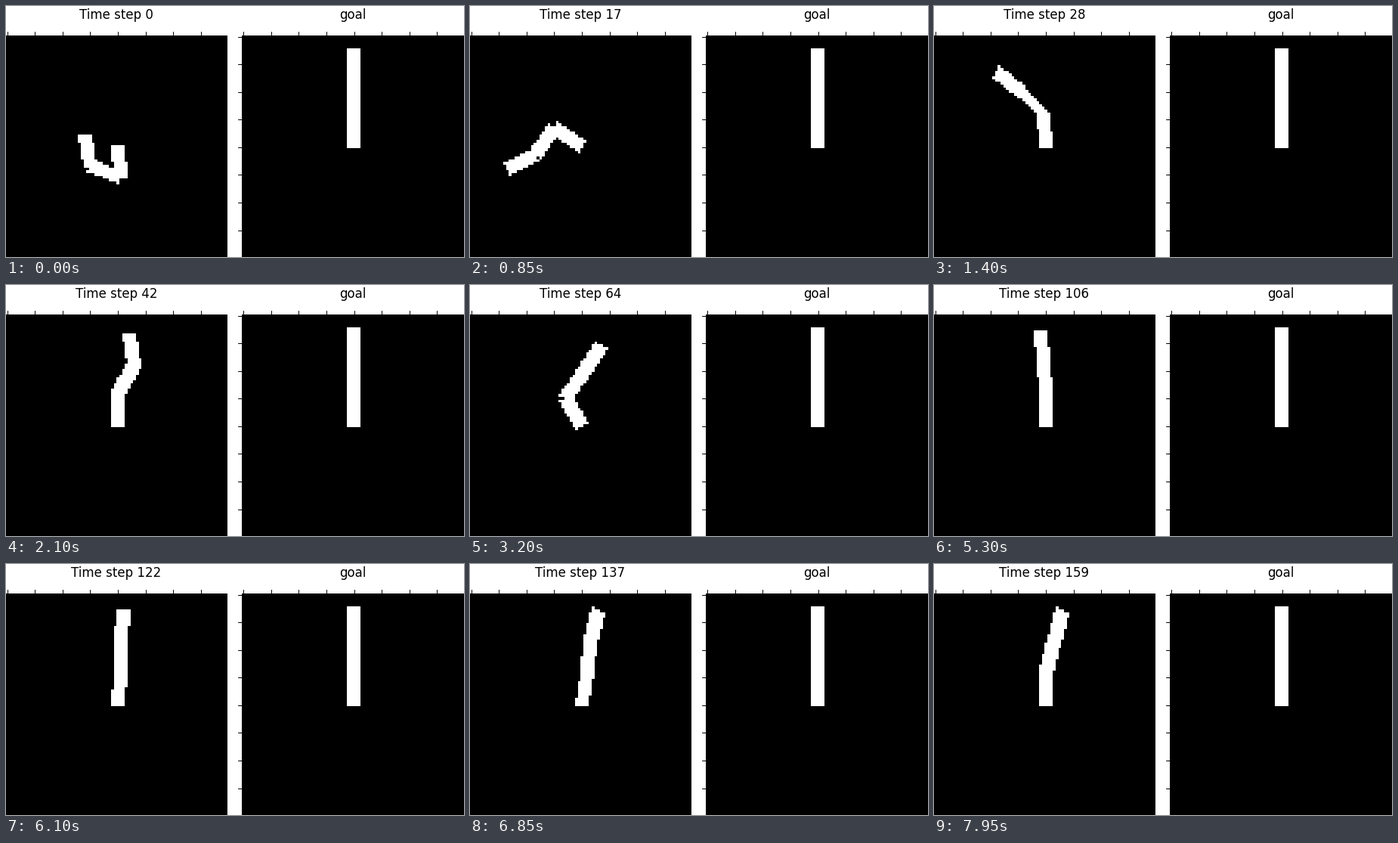
A matplotlib script for the animation above (8000 ms loop, 606 by 332 pixels).

```python
import numpy as np
import matplotlib.pyplot as plt
from matplotlib.animation import FuncAnimation

W, H, DPI = 606, 332, 100
FRAMES, INTERVAL = 160, 50
GRID, PANEL = 80, 293
CELL = PANEL / GRID
LINK, BASE = 11.35, 40
IMAGE_TOP, TOP = 38, 39
LEFT_X, RIGHT_X = 0, 312
TICKS, TICK_GAP, TICK_LEN = 8, 36.58, 5

# step: heading of each link in degrees (0 is up, clockwise)
POSES = {
    0: (174.5, 289.5, 350),
    11: (253, 223, 241),
    17: (302.5, 216, 243.5),
    34: (371, 366, 342),
    42: (362.5, 391, 350),
    64: (330.2, 396, 393.5),
    68: (347.5, 333, 332),
    80: (361, 352, 358),
    106: (362, 355, 355),
    137: (370.5, 366, 375.3),
    159: (362.5, 374, 375),
}
STEPS = np.array(list(POSES))
ANGLES = np.array(list(POSES.values()))
SWAY = 0.26 * np.array([1, -1, 0.5])


def pose_slopes():
    """Slopes at the poses, flat where a heading turns back."""
    rate = np.diff(ANGLES, axis=0) / np.diff(STEPS)[:, None]
    a, b = rate[:-1], rate[1:]
    same = a * b > 0
    mean = np.where(same, 2 * a * b / np.where(same, a + b, 1), 0)
    return np.vstack([rate[:1], mean, rate[-1:]])


SLOPES = pose_slopes()


def headings(step):
    """Smooth path through the poses, with a sway that grows with the gap."""
    i = min(np.searchsorted(STEPS, step, side="right") - 1, len(STEPS) - 2)
    span = STEPS[i + 1] - STEPS[i]
    u = (step - STEPS[i]) / span
    ease = u * u * (3 - 2 * u)
    path = (ANGLES[i] + ease * (ANGLES[i + 1] - ANGLES[i])
            + span * u * (1 - u) * ((1 - u) * SLOPES[i] - u * SLOPES[i + 1]))
    return path + SWAY * span * np.sin(2 * np.pi * u)


def fill_convex(mask, points):
    ys = [y for _, y in points]
    edges = list(zip(points, points[1:] + points[:1]))
    for y in range(max(min(ys), 0), min(max(ys), GRID - 1) + 1):
        xs = [x for x, py in points if py == y]
        for (xa, ya), (xb, yb) in edges:
            if min(ya, yb) < y < max(ya, yb):
                xs.append(xa + (xb - xa) * (y - ya) / (yb - ya))
        lo = int(np.floor(min(xs) + 0.5))
        hi = int(np.ceil(max(xs) - 0.5))
        mask[y, max(lo, 0):hi + 1] = 1


def draw_link(mask, x0, y0, x1, y1):
    """A bar five cells wide whose corners sit on whole cells."""
    dx, dy = x1 - x0, y1 - y0
    size = np.hypot(dx, dy)
    ox, oy = round(2 * dy / size), round(2 * dx / size)
    fill_convex(mask, [(x0 - ox, y0 + oy), (x1 - ox, y1 + oy),
                       (x1 + ox, y1 - oy), (x0 + ox, y0 - oy)])


def arm(degrees):
    mask = np.zeros((GRID, GRID))
    rad = np.radians(degrees)
    xs = BASE + LINK * np.concatenate([[0], np.cumsum(np.sin(rad))])
    ys = BASE - LINK * np.concatenate([[0], np.cumsum(np.cos(rad))])
    joints = [(int(x), int(y)) for x, y in zip(xs, ys)]
    for a, b in zip(joints, joints[1:]):
        draw_link(mask, *a, *b)
    return mask


CELLS = ((np.arange(PANEL) + 0.5) / CELL).astype(int)


def paste(canvas, left, mask):
    pixels = mask[np.ix_(CELLS, CELLS)][TOP - IMAGE_TOP:]
    canvas[TOP:TOP + len(pixels), left:left + PANEL] = pixels


def backdrop():
    canvas = np.ones((H, W))
    canvas[TOP:, LEFT_X:LEFT_X + PANEL] = 0
    canvas[TOP:, RIGHT_X:] = 0
    shade = np.zeros(TICK_LEN)
    shade[0] = 0.15  # soft outer end
    for k in range(TICKS):
        gap = TICK_GAP * k
        for start in (2.15, 314.75):
            canvas[TOP - TICK_LEN:TOP, int(start + gap)] = shade
        canvas[int(41.05 + gap), RIGHT_X - TICK_LEN:RIGHT_X] = shade
    paste(canvas, RIGHT_X, arm(np.zeros(3)))
    return canvas


fig = plt.figure(figsize=(W / DPI, H / DPI), dpi=DPI, facecolor="white")
ax = fig.add_axes([0, 0, 1, 1])
ax.axis("off")
base = backdrop()
picture = ax.imshow(base, cmap="gray", vmin=0, vmax=1, aspect="auto",
                    interpolation="nearest", extent=(0, W, H, 0))
style = dict(fontsize=12, family="DejaVu Sans", color="black",
             ha="center", va="baseline")
title = ax.text(145.8, 17, "", **style)
ax.text(459, 17, "goal", **style)


def update(step):
    canvas = base.copy()
    paste(canvas, LEFT_X, arm(headings(step)))
    picture.set_data(canvas)
    title.set_text(f"Time step {step}")
    return picture, title


anim = FuncAnimation(fig, update, frames=FRAMES, interval=INTERVAL,
                     init_func=lambda: update(0), repeat=True,
                     repeat_delay=0, blit=False)
plt.show()
```
